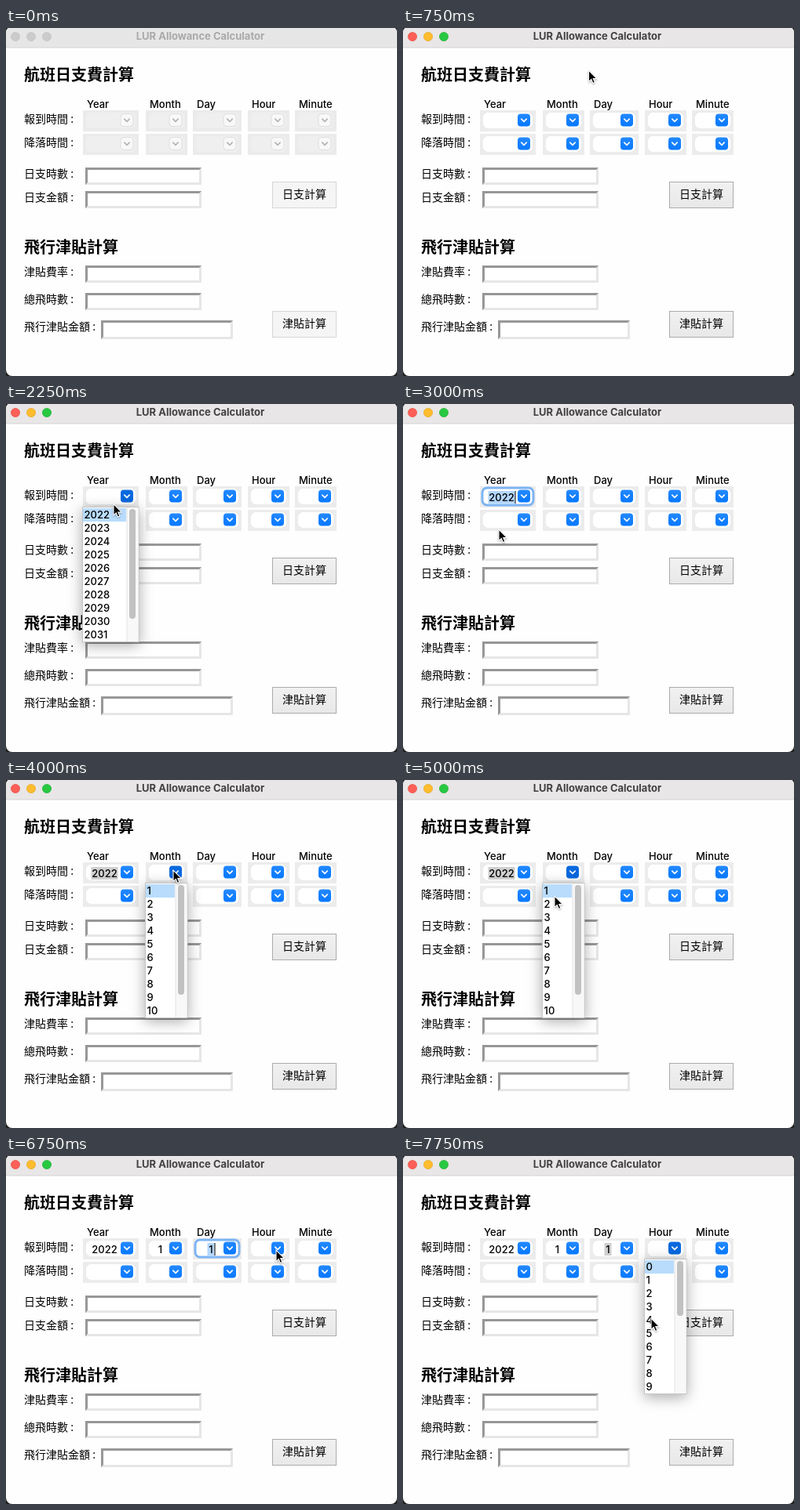
An HTML page for the animation above (8000 ms loop, 498x444 px).

```html
<!DOCTYPE html>
<html lang="zh-Hant">
<head>
<meta charset="utf-8">
<title>Allowance Calculator</title>
<style>
html, body { margin: 0; width: 100%; height: 100%; overflow: hidden; background: #222; }
svg { display: block; width: 498px; height: 444px; }
text { font: 500 13px Inter, "Noto Sans CJK TC", "Noto Sans CJK", sans-serif; fill: #000; }
.zh { font-size: 14px; font-weight: 400; font-family: "Noto Sans CJK TC", "Noto Sans CJK", sans-serif; }
.head { font-size: 20px; font-weight: 700; }
.title { font-weight: 700; fill: #434141; }
.mid { text-anchor: middle; }
.bar { fill: #e8e6e6; }
.box { fill: #ececec; }
.field { fill: #fff; filter: drop-shadow(0 .5px .6px #0004); }
.arrow { fill: url(#blue); }
.chev { fill: none; stroke: #fff; stroke-width: 1.7; stroke-linecap: round; stroke-linejoin: round; }
.push { fill: url(#face); stroke: #ababab; }
.ring { fill: none; stroke: #7db4f4; stroke-width: 3; }
.open .arrow { fill: #0a69de; }
.list { filter: drop-shadow(0 4px 9px #0005); }

.off .title { fill: #a9a9a9; }
.off .bar { fill: #e6e6e6; }
.off .light { fill: #cbcbcb; stroke: #c0c0c0; }
.off .box { fill: #ebebeb; }
.off .field { fill: #efefef; filter: none; }
.off .arrow { fill: #f8f8f8; stroke: #dedede; }
.off .chev { stroke: #b4b4b4; }
.off .push { fill: #f5f5f5; stroke: #d6d6d6; }
</style>
</head>
<body>
<svg id="stage" viewBox="0 0 498 444">
  <defs>
    <linearGradient id="face" x2="0" y2="1">
      <stop stop-color="#f1f1f1"/><stop offset="1" stop-color="#e8e8e8"/>
    </linearGradient>
    <linearGradient id="blue" x2="0" y2="1">
      <stop stop-color="#2489ff"/><stop offset="1" stop-color="#0678ff"/>
    </linearGradient>
    <clipPath id="win"><rect y="-2" width="498" height="446" rx="8"/></clipPath>
  </defs>
  <g clip-path="url(#win)">
    <rect width="498" height="444" fill="#fefefe"/>
    <rect class="bar" width="498" height="25"/>
    <rect y="24.5" width="498" height="1" fill="#d6d5d5"/>
    <g id="form"></g>
  </g>
  <g id="lists"></g>
  <path id="cursor" d="M0 0V14.6L3.3 11.5 5.5 16.6 7.9 15.6 5.8 10.6H10.4Z"
    stroke="#fff" stroke-width="1.1" style="filter:drop-shadow(0 1px 1px #0005)"/>
</svg>
<script>
const $ = id => document.getElementById(id);
const LOOP = 8000, TICK = 250, ACTIVE = 750;

const rect = (x, y, w, h, attrs = '') =>
  `<rect x="${x}" y="${y}" width="${w}" height="${h}" ${attrs}/>`;
const text = (x, y, s, cls = '') => `<text x="${x}" y="${y}" class="${cls}">${s}</text>`;

// Sunken text entry
function entry(x, y, w, h) {
  const r = x + w, b = y + h;
  return rect(x, y, w, h, 'fill="#e6e6e6"') +
    `<path d="M${x} ${y}H${r}L${r - 3} ${y + 3}H${x + 3}V${b - 3}L${x} ${b}Z" fill="#979797"/>` +
    rect(x + 3, y + 3, w - 6, h - 6, 'fill="#fff"');
}

function button(y, label) {
  return rect(339.5, y + .5, 81, 33, 'class="push"') + text(380, y + 21, label, 'zh mid');
}

function combo(l, r, cy, id) {
  const ax = r - 15;
  return `<g id="${id}">` +
    rect(l, cy - 13, r - l, 27, 'class="box"') +
    rect(l + 4, cy - 10, r - l - 8, 20, 'rx="5" class="field"') +
    `<g class="value"></g>` +
    rect(ax - 8, cy - 8.5, 16, 16, 'rx="4" class="arrow"') +
    `<path class="chev" d="M${ax - 3.2} ${cy - 1.8}l3.2 3.2 3.2-3.2"/></g>`;
}

// Times: open list, pick a value, lose focus, drop the selection
const never = Infinity;
const cols = [
  { name: 'Year', l: 98, r: 169, first: 2022, count: 12, open: 2000, pick: 2750, blur: 4000, clear: 5250 },
  { name: 'Month', l: 178, r: 231, first: 1, count: 12, open: 4000, pick: 5250, blur: 6000, clear: 6500 },
  { name: 'Day', l: 238, r: 300, first: 1, count: 31, open: 6000, pick: 6500, blur: 7000, clear: never },
  { name: 'Hour', l: 308, r: 361, first: 0, count: 24, open: 7000, pick: never, blur: never, clear: never },
  { name: 'Minute', l: 368, r: 421, open: never, pick: never }
];

function list({ l, r, first, count }, i) {
  let s = rect(l - .5, 131.5, r - l + .5, 172, 'fill="#fff" stroke="#c4c4c4"') +
    rect(r - 15, 132, 14.5, 171, 'fill="#f8f8f8"') +
    rect(r - 15.5, 132, 1, 171, 'fill="#e4e4e4"') +
    rect(l, 133, r - l - 16, 17, 'fill="#b9dcfd"') +
    rect(r - 12, 134, 8, Math.round(168 * 10 / count), 'rx="4" fill="#c1c1c1"');
  for (let n = 0; n < 10; n++) s += text(l + 1.5, 146 + n * 17, first + n);
  return `<g id="list${i}" class="list">${s}</g>`;
}

function build() {
  const lights = [['#fe5f57', '#e2463f'], ['#febc2e', '#e1a116'], ['#28c840', '#12ac28']];
  let s = lights.map(([fill, edge], i) =>
    `<circle class="light" cx="${12 + i * 20}" cy="11" r="5.6" fill="${fill}" stroke="${edge}" stroke-width=".6"/>`).join('');
  s += text(247.5, 15, 'LUR Allowance Calculator', 'title mid');
  s += text(23, 67, '航班日支費計算', 'zh head') + text(23, 287, '飛行津貼計算', 'zh head');
  const labels = [['報到時間', 116], ['降落時間', 146], ['日支時數', 186], ['日支金額', 216],
    ['津貼費率', 311], ['總飛時數', 346], ['飛行津貼金額', 381]];
  for (const [label, y] of labels) s += text(23, y + 4.5, label + ' :', 'zh');
  for (const y of [178, 208, 303, 338]) s += entry(101, y, 148, 22);
  s += entry(121, 373, 168, 24);
  s += button(196, '日支計算') + button(361, '津貼計算');
  cols.forEach((c, i) => {
    s += text(c.l + 5, 101.5, c.name) + combo(c.l, c.r, 118, 'top' + i) + combo(c.l, c.r, 148, 'low' + i);
  });
  $('form').innerHTML = s;
  $('lists').innerHTML = cols.slice(0, 4).map(list).join('');
}

function value({ l, r, first, pick, blur, clear }, t) {
  if (t < pick) return '';
  const mid = (l + r) / 2 - 8, half = first > 99 ? 17 : 4.5;
  const focus = t < blur;
  let s = '';
  if (t < clear) s += rect(mid - half, 111, half * 2, 16, `fill="${focus ? '#b3d7ff' : '#cfcfcf'}"`);
  s += text(mid, 124, first, 'mid');
  if (focus) s += rect(mid + half, 111, 1, 16) + rect(l + 3, 107, r - l - 6, 22, 'rx="6" class="ring"');
  return s;
}

// Pointer path: time, x, y
const path = [
  [500, 268, 32], [1000, 205, 76], [1500, 150, 110], [2000, 150, 110], [2500, 124, 145],
  [3000, 122, 160], [3250, 146, 152], [3750, 213, 115], [4250, 213, 115], [5000, 193, 148],
  [5250, 210, 144], [5500, 268, 118], [5750, 281, 114], [6000, 281, 114], [6250, 256, 145],
  [6500, 284, 140], [6750, 344, 120], [7000, 344, 120], [7750, 316, 207]
];

function pointer(t) {
  const n = path.findIndex(p => p[0] > t);
  if (n < 0) return path[path.length - 1].slice(1);
  const [a, b] = [path[n - 1], path[n]], k = (t - a[0]) / (b[0] - a[0]);
  return [a[1] + (b[1] - a[1]) * k, a[2] + (b[2] - a[2]) * k];
}

function draw(t) {
  $('stage').classList.toggle('off', t < ACTIVE);
  cols.forEach((c, i) => {
    const open = t >= c.open && t < c.pick, el = $('top' + i);
    el.classList.toggle('open', open);
    el.querySelector('.value').innerHTML = value(c, t);
    if (i < 4) $('list' + i).style.display = open ? '' : 'none';
  });
  const shown = t >= path[0][0];
  $('cursor').style.display = shown ? '' : 'none';
  if (shown) $('cursor').setAttribute('transform', `translate(${pointer(t)})`);
}

build();
draw(0);
const start = performance.now();
let last = 0;
function frame() {
  const t = Math.floor((performance.now() - start) % LOOP / TICK) * TICK;
  if (t !== last) draw(last = t);
  requestAnimationFrame(frame);
}
requestAnimationFrame(frame);
</script>
</body>
</html>
```
